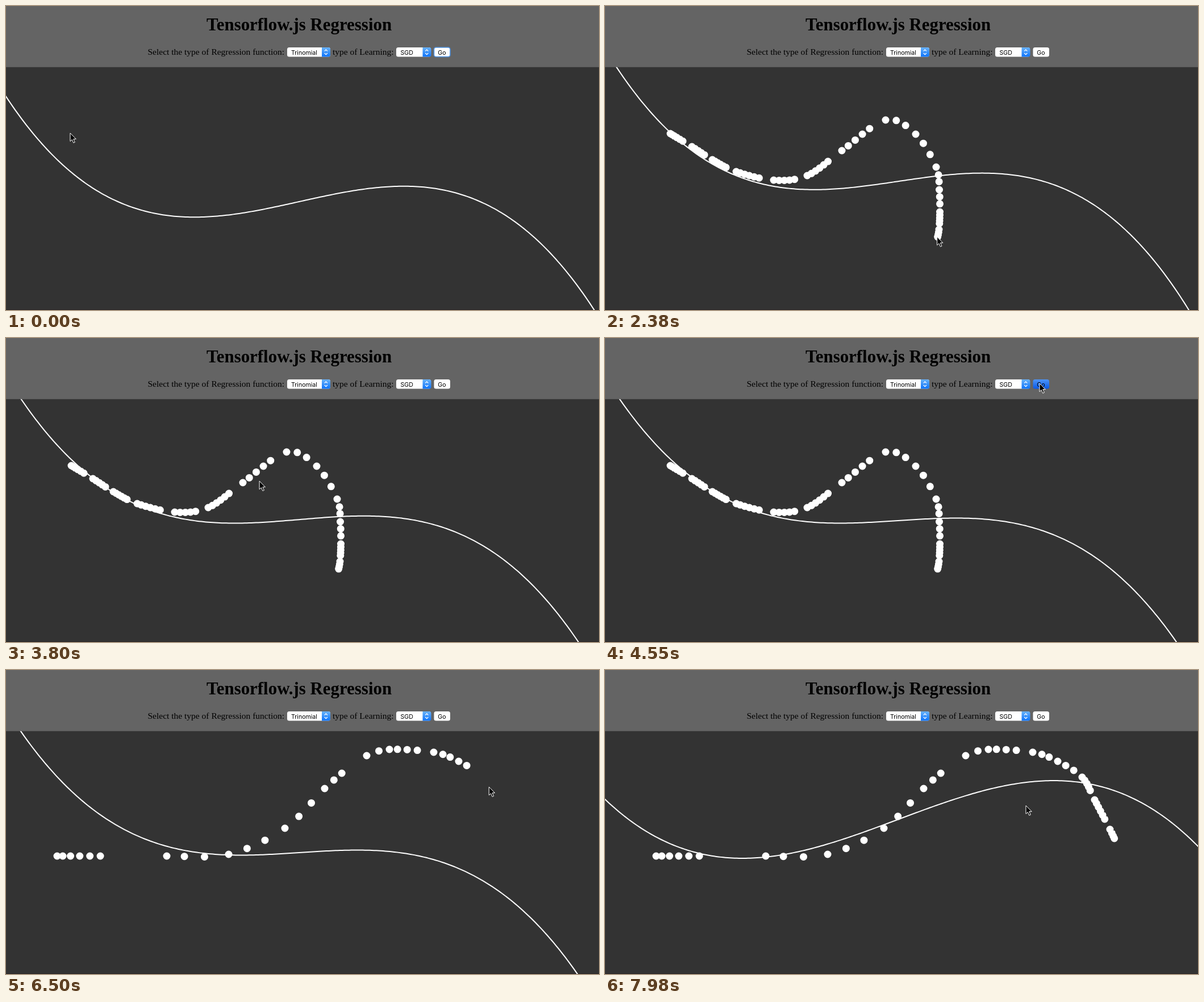
Animation of 1044x536 px, one loop 8000 ms. Source, as an HTML page:

```html
<!DOCTYPE html>
<html lang="en">
<head>
<meta charset="utf-8">
<title>Tensorflow.js Regression</title>
<style>
  html, body { margin: 0; width: 100%; height: 100%; overflow: hidden; background: #333; }
  svg { display: block; width: 1044px; height: 536px; }
  .serif { font: 15.5px "Liberation Serif", serif; }
  .title { font: bold 30.9px "Liberation Serif", serif; }
  .control { font: 10.6px Inter, sans-serif; }
  .line { fill: none; stroke: #fff; }
</style>
</head>
<body>
<svg viewBox="0 0 1044 536">
  <defs>
    <linearGradient id="blue" x2="0" y2="1">
      <stop stop-color="#69b2fa"/><stop offset="1" stop-color="#0d74fc"/>
    </linearGradient>
    <linearGradient id="pressed" x2="0" y2="1">
      <stop stop-color="#4d94f6"/><stop offset="1" stop-color="#0a5ae6"/>
    </linearGradient>
    <g id="arrows">
      <path d="M0 0h11.5a3.5 3.5 0 0 1 3.5 3.5v9.5a3.5 3.5 0 0 1 -3.5 3.5h-11.5z" fill="url(#blue)"/>
      <path class="line" stroke-width="1.3" d="M4.7 6.6l2.6-2.6 2.6 2.6M4.7 10l2.6 2.6 2.6-2.6"/>
    </g>
  </defs>
  <rect width="1044" height="536" fill="#333"/>
  <rect y="535" width="1044" height="1" fill="#2a2425"/>
  <path id="curve" class="line" stroke-width="2"/>
  <path id="dots" class="line" stroke-width="13" stroke-linecap="round"/>
  <rect width="1044" height="107.8" fill="#646464"/>
  <text class="title" x="353" y="43">Tensorflow.js Regression</text>
  <g class="serif">
    <text x="249.5" y="86">Select the type of Regression function:</text>
    <text x="575" y="86">type of Learning:</text>
  </g>
  <g class="control">
    <rect x="495" y="73" width="76" height="16.5" rx="3.5" fill="#fff"/>
    <rect x="687" y="73" width="61" height="16.5" rx="3.5" fill="#fff"/>
    <rect id="go" x="753.5" y="73" width="28.5" height="16.5" rx="3.5" stroke="#4f92e0"/>
    <use href="#arrows" x="556" y="73"/>
    <use href="#arrows" x="733.5" y="73"/>
    <text x="502" y="85.6">Trinomial</text>
    <text x="694.5" y="85.6">SGD</text>
    <text x="760.3" y="85.6">Go</text>
  </g>
  <path id="cursor" d="M0 0V14.6L3.3 11.6 5.8 17.3 8.3 16.2 5.8 10.6H10.3Z" stroke="#fff"/>
</svg>
<script>
const LOOP = 8000, REFRESH = 130, LAG = 110;
const PRESS = 4550, RELEASE = PRESS + REFRESH;
const BURST = 0.62; // share of each path segment that the pointer events cover
const [curve, dots, go, cursor] = ['curve', 'dots', 'go', 'cursor'].map(id => document.getElementById(id));

// Catmull-Rom spline through p1 and p2
const spline = (p0, p1, p2, p3, u) => [0, 1].map(k => p1[k] + u / 2 * (p2[k] - p0[k]
  + u * (2 * p0[k] - 5 * p1[k] + 4 * p2[k] - p3[k] + u * (3 * (p1[k] - p2[k]) + p3[k] - p0[k]))));

// Path points are x, y and the number of events in the burst that starts there
const sample = path => path.slice(0, -1).flatMap(([x, y, n], i) => Array.from({ length: n }, (_, j) =>
  spline(path[i - 1] || path[i], path[i], path[i + 1], path[i + 2] || path[i + 1], BURST * j / (n - 1))));

const strokes = [
  {
    begin: 350, end: 1680, leave: 2500,
    points: sample([
      [115, 225, 6], [153, 248, 5], [189, 271, 6], [231, 292, 6], [297, 307, 5], [356, 299, 6],
      [417, 255, 5], [494, 201, 3], [547, 226, 3], [583, 284, 3], [588.5, 324, 3], [589.5, 363, 5],
      [588, 394, 4], [584.5, 412]
    ])
  },
  {
    begin: 5525, end: 6825, leave: 7100,
    points: sample([
      [90, 328, 6], [215, 328, 0], [283, 328, 3], [392, 325, 3], [491, 279, 3], [561, 209, 3],
      [606, 170, 0], [635, 151, 2], [675, 140, 4], [753, 145, 3], [797, 161, 3], [840, 189, 5],
      [862, 229, 6], [889, 281, 4], [899, 302]
    ])
  }
];

// Pointer between the strokes: time, x, y
const travel = [
  [0, 113, 224], [2500, 585, 405], [3250, 191, 390], [4420, 765, 80],
  [RELEASE, 765, 80], [5525, 89, 328], [7100, 894, 294], [7800, 741, 239]
];

// Learned weights: time, constant, linear, cubic
const weights = [
  [1500, 345, -116, 310.7], [2340, 309.2, -77.2, 320.8], [3250, 318.8, -50.8, 315],
  [4500, 322, -34.2, 297.5], [6700, 322, -34.2, 297.5], [7930, 263.5, -195.8, 237.2]
];

function at(keys, t) {
  const next = keys.findIndex(key => key[0] > t);
  if (next < 1) return (next ? keys.at(-1) : keys[0]).slice(1);
  const a = keys[next - 1], b = keys[next];
  const f = (t - a[0]) / (b[0] - a[0]);
  return a.slice(1).map((v, i) => v + (b[i + 1] - v) * f);
}

function trinomial([constant, linear, cubic]) {
  let d = 'M';
  for (let x = -4; x <= 1048; x += 4) {
    const s = (x - 516) / 522;
    d += `${x} ${(constant + linear * s + cubic * s ** 3).toFixed(2)} `;
  }
  return d;
}

function draw(now) {
  const t = Math.floor(now % LOOP / REFRESH) * REFRESH;
  const { points, begin, end, leave } = strokes[t < RELEASE ? 0 : 1];
  const eventAt = time => Math.min(1, (time - begin) / (end - begin)) * (points.length - 1);

  const count = Math.max(0, Math.round(eventAt(t - LAG) + (t - LAG >= end)));
  dots.setAttribute('d', points.slice(0, count).map(([x, y]) => `M${x} ${y}h.01`).join(''));

  const drawing = t >= begin && t < leave;
  const [x, y] = drawing ? points[Math.round(eventAt(t))] : at(travel, t);
  cursor.setAttribute('transform', `translate(${x - drawing} ${y})`);

  curve.setAttribute('d', trinomial(at(weights, t)));
  go.setAttribute('fill', t >= PRESS && t < RELEASE ? 'url(#pressed)' : '#fff');
  go.setAttribute('stroke-width', t < strokes[0].begin ? 1.6 : 0);
  requestAnimationFrame(draw);
}
requestAnimationFrame(draw);
</script>
</body>
</html>
```
